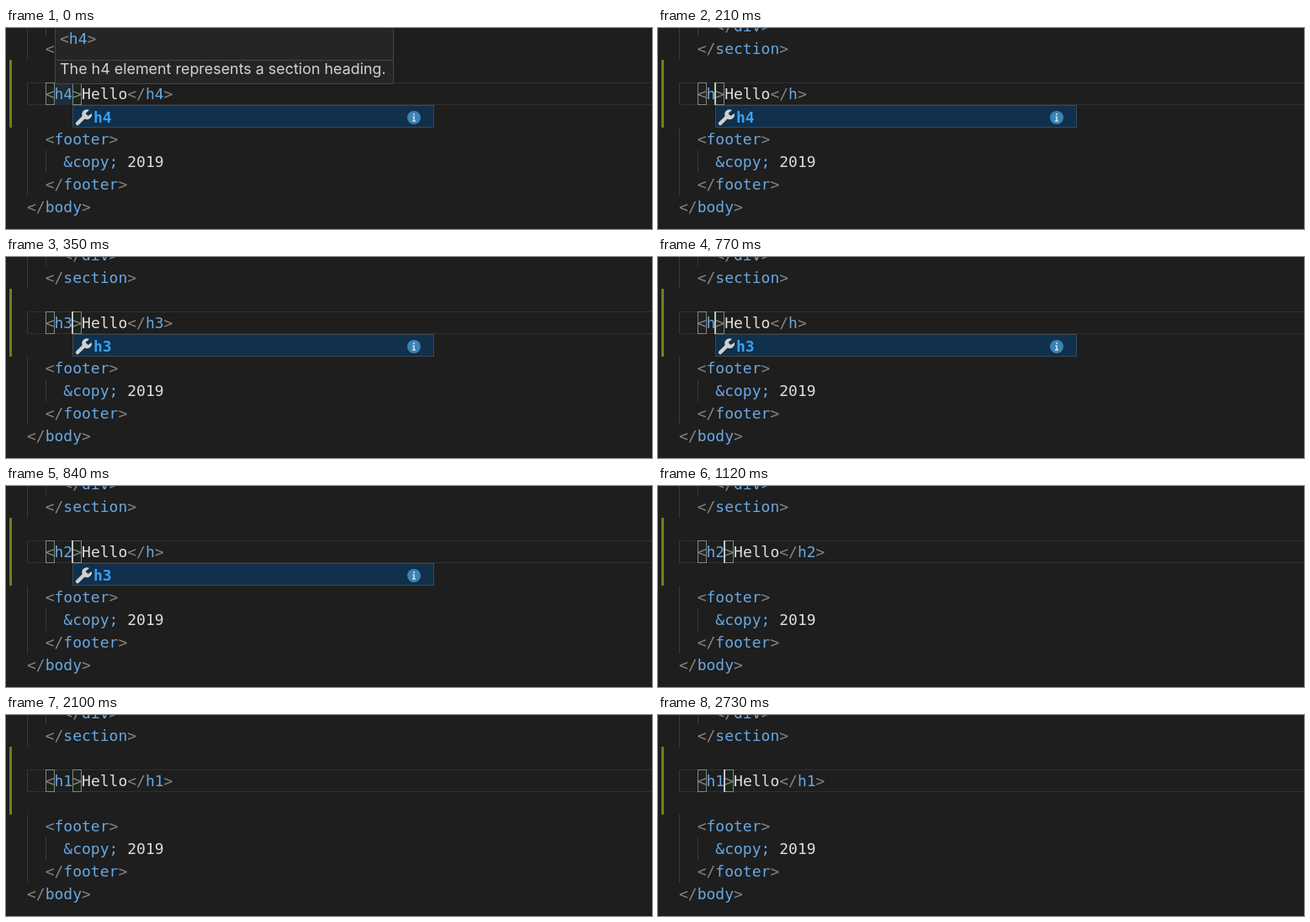
Write an HTML page that moves like this. It is 768 px wide and 240 px high and loops after 2940 ms.

```html
<!DOCTYPE html>
<html lang="en">
<head>
<meta charset="utf-8">
<title>Renaming a heading tag</title>
<style>
  html, body { margin: 0; width: 100%; height: 100%; overflow: hidden; background: #1e1e1e; }
  svg { display: block; }
  text { font: 18px "DejaVu Sans Mono", monospace; fill: #dedede; white-space: pre; }
  .bracket { fill: #858585; }
  .name { fill: #68a8e2; }
  .label { font-weight: bold; fill: #3aa0f3; }
  .doc { font: 17.9px Inter, sans-serif; fill: #d2d2d2; }
  .match { fill: #1c241c; stroke: #858585; }
</style>
</head>
<body>
<svg id="stage" width="768" height="240" viewBox="0 0 768 240"></svg>
<script>
const LOOP = 2940, CHAR = 10.836, LEFT = 25, ROW = 27;
const stage = document.getElementById('stage');

// start time, opening name, closing name, suggestion, caret visible
const states = [
  [0, 'h4', 'h4', 'h4', false],
  [210, 'h', 'h', 'h4', true],
  [280, 'h3', 'h', 'h4', true],
  [350, 'h3', 'h3', 'h3', true],
  [560, 'h3', 'h3', 'h3', false],
  [770, 'h', 'h', 'h3', true],
  [840, 'h2', 'h', 'h3', true],
  [910, 'h2', 'h2', '', true],
  [1400, 'h2', 'h2', '', false],
  [1540, 'h', 'h2', '', true],
  [1610, 'h', 'h', '', true],
  [1680, 'h1', 'h1', '', true],
  [2100, 'h1', 'h1', '', false],
  [2660, 'h1', 'h1', '', true],
];

const colX = col => LEFT + col * CHAR;
const escape = s => s.replace(/&/g, '&amp;').replace(/</g, '&lt;');
const rect = (x, y, w, h, attrs) =>
  `<rect x="${x}" y="${y}" width="${w}" height="${h}" ${attrs}/>`;
const span = (cls, s) => `<tspan class="${cls}">${escape(s)}</tspan>`;

// One line of markup with coloured brackets, tag names and entities
function code(x, y, source) {
  const body = source.replace(/(<\/?)(\w+)(>)|&\w+;/g, (all, open, name, close) =>
    open ? span('bracket', open) + span('name', name) + span('bracket', close) : span('name', all));
  return `<text x="${x}" y="${y}">${body}</text>`;
}

const line = (row, col, source) => code(colX(col), 4 + row * ROW, source);
const guide = (x, y, h) => rect(x, y, 1, h, 'fill="#40353a"');
const match = col => rect(Math.round(colX(col)) + .5, 65.5, 10, 26, 'class="match"');

const backdrop =
  rect(4, 38, 3, 81, 'fill="#64851b"') +
  guide(25, 0, 38) + guide(25, 65, 27) + guide(25, 119, 81) +
  guide(47, 0, 11) + guide(47, 146, 27) +
  rect(25, 65, 743, 1, 'fill="#303030"') + rect(25, 91, 743, 1, 'fill="#303030"') +
  line(0, 4, '</div>') + line(1, 2, '</section>') +
  line(5, 2, '<footer>') + line(6, 4, '&copy; 2019') +
  line(7, 2, '</footer>') + line(8, 0, '</body>');

function suggestion(x, label) {
  return `<g transform="translate(${x} 92)">
    ${rect(.5, .5, 429, 26, 'fill="#10304b" stroke="#3c4852"')}
    <path d="M6 22 L14 14" stroke="#d0d0d0" stroke-width="4.5" stroke-linecap="round"/>
    <path d="M20 6 A6 6 0 1 0 23 10 L18.500 13 L15.500 10Z" fill="#d0d0d0"/>
    <text class="label" x="25" y="21">${label}</text>
    <circle cx="406" cy="15" r="8" fill="#3b83b2"/>
    <path d="M406 10v2M404.500 14h1.500v5M404 19h4" fill="none" stroke="#cfe0ea" stroke-width="1.600"/>
  </g>`;
}

const tooltip =
  rect(58.5, -20.5, 402, 87, 'fill="#252526" stroke="#454545"') +
  rect(59, 38, 401, 1, 'fill="#454545"') +
  code(64, 19, '<h4>') +
  '<text class="doc" x="64" y="55">The h4 element represents a section heading.</text>';

function draw([start, open, close, label, caret]) {
  const end = 3 + open.length, caretX = Math.round(colX(end));
  const hovering = start === 0;
  return backdrop +
    (hovering ? rect(57, 65, 22, 27, 'fill="#202c38"') : '') +
    match(2) + match(end) +
    line(3, 2, `<${open}>Hello</${close}>`) +
    (caret ? rect(caretX - 1, 65, 2, 27, 'fill="#c4c4c0"') : '') +
    (label ? suggestion(caretX, label) : '') +
    (hovering ? tooltip : '');
}

let shown;
function tick() {
  const t = performance.now() % LOOP;
  const state = states.findLast(s => s[0] <= t);
  if (state !== shown) stage.innerHTML = draw(shown = state);
  requestAnimationFrame(tick);
}
tick();
</script>
</body>
</html>
```
